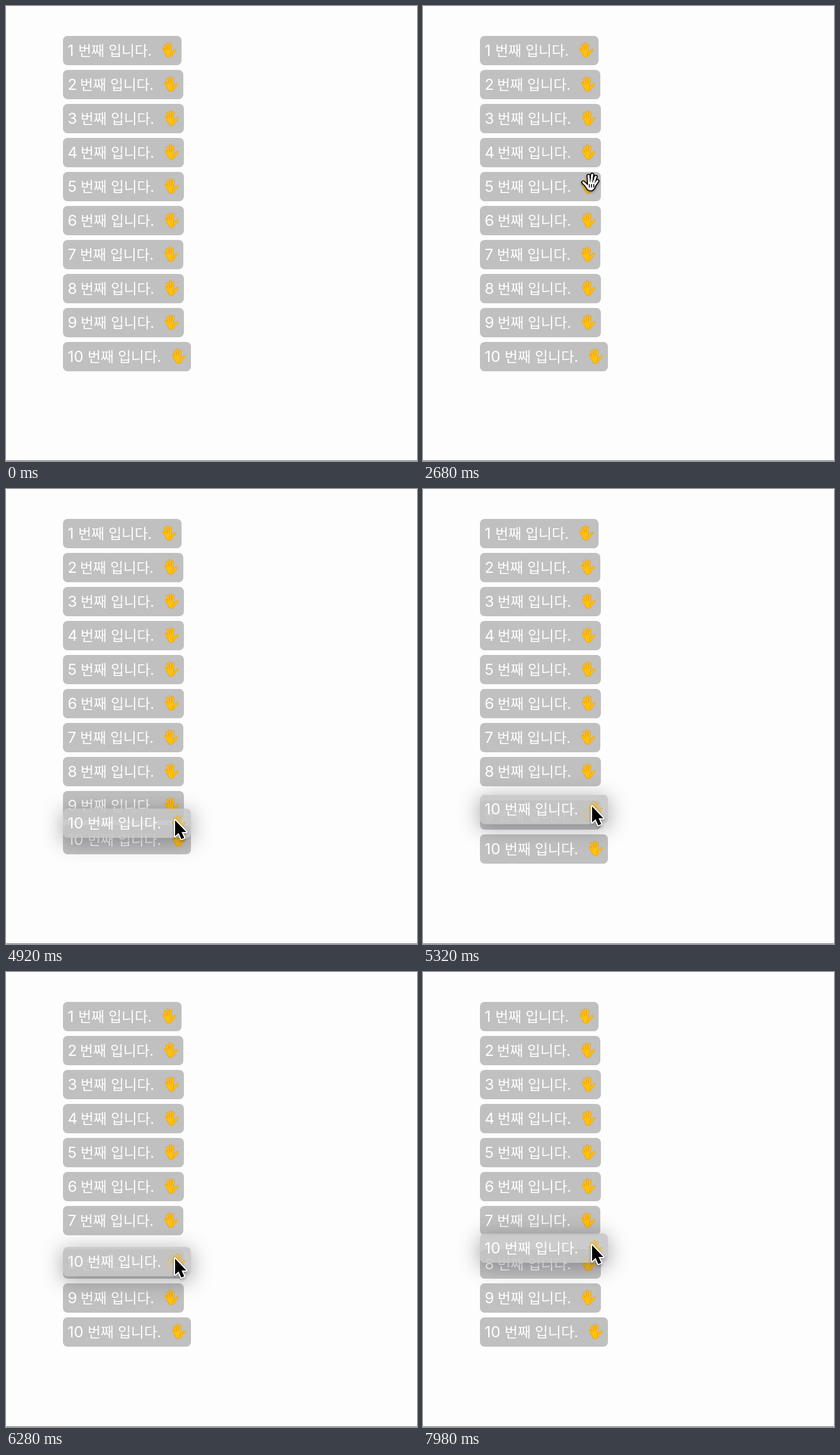
These frames come from a looping animation (700 by 776 pixels, 8000 ms). An HTML page:

```html
<!DOCTYPE html>
<html lang="ko">
<head>
<meta charset="utf-8">
<title>Drag list</title>
<style>
  html, body { margin: 0; width: 100%; height: 100%; overflow: hidden; background: #fdfdfd; }
  #stage { position: absolute; left: 0; top: 0; width: 700px; height: 776px; overflow: hidden; background: #fdfdfd; }
  #stage::after { content: ""; position: absolute; left: 0; bottom: 0; width: 100%; height: 1px; background: #6e6e6e; }
  .card, .pointer { position: absolute; left: 0; top: 0; }
  .card { height: 50px; border-radius: 8px; background: #c0c0c0; color: #fff; white-space: pre; }
  .num, .label { position: absolute; }
  .num { left: 8px; top: 0; font: 26px/50px Inter, sans-serif; }
  .label { top: -1px; font: 24.3px/50px "Noto Sans CJK KR", "Noto Sans CJK", "Noto Sans KR", sans-serif; }
  .hand { position: absolute; right: 9px; top: 10px; width: 24px; height: 28px; }
  .ghost { background: rgba(196, 196, 196, .88); box-shadow: 0 6px 34px 2px rgba(55, 55, 65, .4); }
  .ghost .hand { opacity: .6; }
  .pointer { overflow: visible; width: 1px; height: 1px; filter: drop-shadow(0 2px 2px rgba(0, 0, 0, .35)); }
</style>
</head>
<body>
<div id="stage"></div>
<script>
const LOOP = 8000;
const LEFT = 97, TOP = 51, PITCH = 58, GAP = 16;
const DRAG_START = 4400;
const widths = [202, 205, 206, 206, 206, 206, 205, 206, 206, 218];
const stage = document.getElementById('stage');

const fingers = 'M6 18 2.4 12.4M8 16 4.8 6M11 15 9.6 3M14 16 14.7 4.6';
const thumb = 'M15 23.5Q17.5 18 22 14.4';
const palm = 'M5 17Q10 13 14.5 15L16 19.5Q17.5 25 12 26Q7 26.5 5 17Z';

function handShape(fill, edge, rim) {
  const layer = (color, grow) =>
    `<g fill="none" stroke="${color}" stroke-linecap="round" stroke-linejoin="round">
      <path d="${fingers}" stroke-width="${2.7 + grow}"/>
      <path d="${thumb}" stroke-width="${2.7 + grow}"/>
      <path d="${palm}" fill="${color}" stroke-width="${.6 + grow}"/></g>`;
  return layer(edge, rim) + layer(fill, 0);
}

const emoji = `<svg class="hand" viewBox="0 0 24 28">${handShape('#ffc20f', '#ee960c', 1.3)}
  <path d="M14 24Q12.5 20.5 16 18" fill="none" stroke="#ee960c" stroke-width=".9"/></svg>`;

function add(html) {
  stage.insertAdjacentHTML('beforeend', html);
  return stage.lastElementChild;
}

function makeCard(i, extra = '') {
  const w = widths[i];
  return add(`<div class="card ${extra}" style="width:${w}px">
    <span class="num">${i + 1}</span><span class="label" style="left:${w - 176}px">번째 입니다.</span>${emoji}</div>`);
}

const cards = widths.map((_, i) => makeCard(i));
const ghost = makeCard(9, 'ghost');

const arrowPath = 'M0 0V27L6 21.5 10.5 32 15.5 30 11 20H19Z';
const arrow = add(`<svg class="pointer">
  <path d="${arrowPath}" stroke="#fff" stroke-width="4" stroke-linejoin="round"/><path d="${arrowPath}"/></svg>`);
const badge = add(`<svg class="pointer">
  <defs><linearGradient id="green" x2="0" y2="1"><stop stop-color="#43b512"/><stop offset="1" stop-color="#138000"/></linearGradient></defs>
  <circle cx="18" cy="45" r="18" fill="url(#green)"/>
  <path d="M8 45H28M18 35V55" stroke="#fff" stroke-width="4.4"/></svg>`);
const grab = add(`<svg class="pointer">
  <g transform="translate(15 -12) scale(-1.24 1.16)">${handShape('#fff', '#000', 2.8)}
  <path d="M7.5 17V22M10.5 17V22M13.5 17V22" stroke="#000" stroke-width="1.3"/></g></svg>`);

// Rows: time, x, y of the pointer tip.
const path = [
  [960, 700, 440], [1240, 520, 520], [1500, 290, 600], [1700, 218, 614], [1820, 218, 614],
  [2060, 284, 592], [2540, 285, 286], [2660, 285, 286], [3300, 288, 593], [DRAG_START, 288, 593],
  [4920, 288, 565], [5720, 288, 518], [6300, 288, 488], [6740, 288, 470], [7300, 288, 466]
];

function pointerAt(t) {
  const n = path.findIndex(row => row[0] > t);
  if (n === 0) return path[0].slice(1);
  if (n < 0) return path.at(-1).slice(1);
  const [a, b] = [path[n - 1], path[n]];
  const k = (t - a[0]) / (b[0] - a[0]);
  return [1, 2].map(j => a[j] + (b[j] - a[j]) * k);
}

// The pointer becomes an open hand over the hand icon of any card.
function overHandle(x, y) {
  const i = Math.floor((y - TOP) / PITCH);
  const dx = LEFT + widths[i] - x, dy = y - TOP - PITCH * i;
  return dx > 6 && dx < 36 && dy < 44;
}

const place = (el, x, y) => { el.style.transform = `translate(${x}px, ${y}px)`; };
const show = (el, on) => { el.style.visibility = on ? 'visible' : 'hidden'; };

function draw(t) {
  const [x, y] = pointerAt(t);
  const dragging = t >= DRAG_START;
  const holding = !dragging && overHandle(x, y);
  const opening = t < 5040 ? 10 : t < 5960 ? 8 : 7;

  cards.forEach((card, i) => place(card, LEFT, TOP + PITCH * i + (i >= opening ? GAP : 0)));
  place(ghost, LEFT + x - 288, y - 20);
  for (const el of [arrow, badge, grab]) place(el, x, y);
  show(ghost, dragging);
  show(arrow, t >= path[0][0] && !holding);
  show(grab, holding);
  show(badge, t >= 6400 && t < 7000);
}

const start = performance.now();
function tick() {
  draw((performance.now() - start) % LOOP);
  requestAnimationFrame(tick);
}
tick();
</script>
</body>
</html>
```
